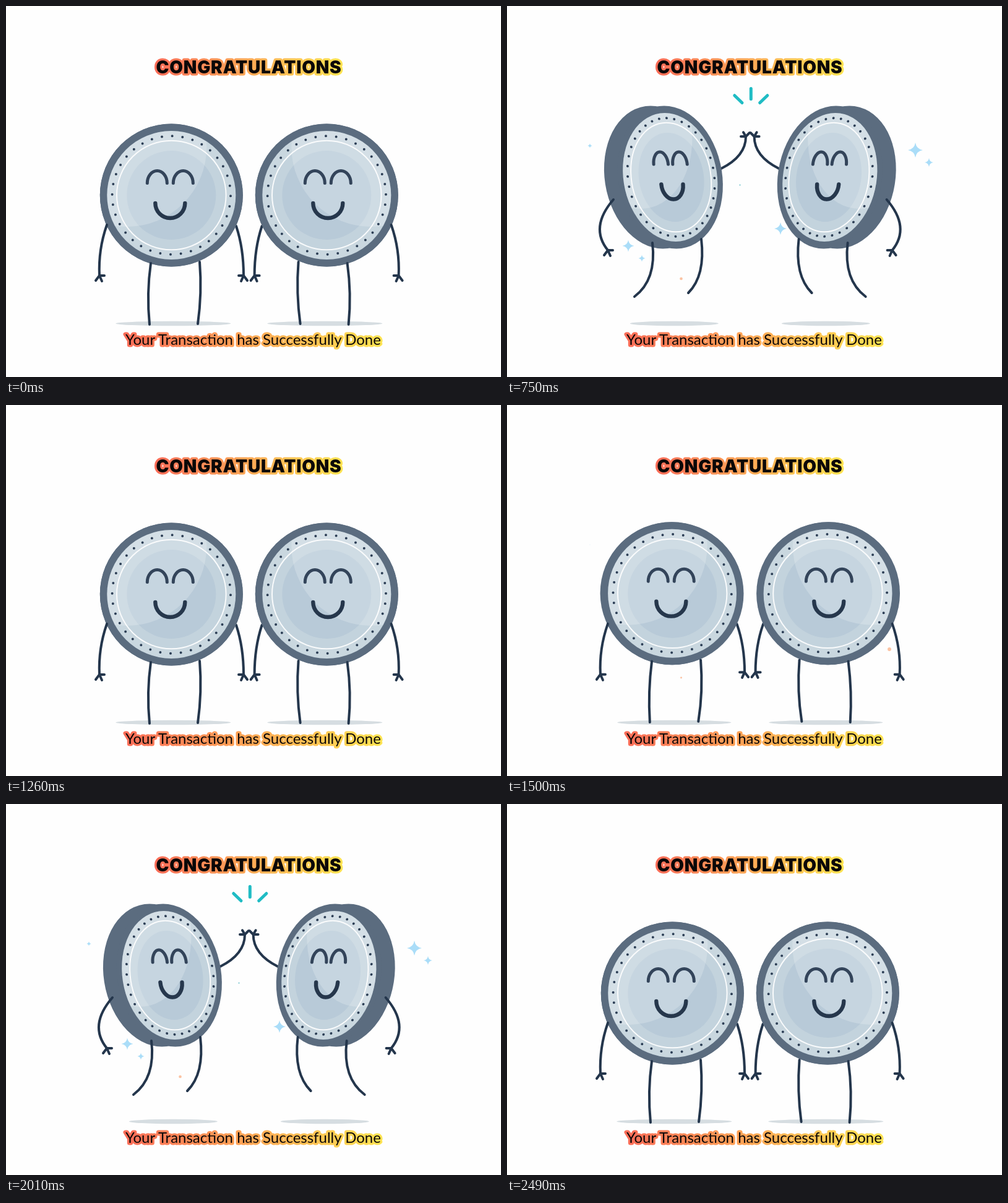
Animation, 800 px wide and 600 px high, one loop 2520 ms. Source, as an HTML page with a canvas:

```html
<!DOCTYPE html>
<html lang="en">
<head>
<meta charset="utf-8">
<title>Congratulations</title>
<style>
  html, body { margin: 0; width: 100%; height: 100%; overflow: hidden; background: #fefefe; }
  canvas, svg { position: absolute; left: 0; top: 0; width: 800px; height: 600px; }
  text { text-anchor: middle; fill: #0b0808; stroke: url(#warm); stroke-width: 7px; stroke-linejoin: round; paint-order: stroke; }
  .title { font: 900 28px Inter, sans-serif; letter-spacing: .8px; }
  .note { font: 400 24px Lato, sans-serif; }
</style>
</head>
<body>
<canvas id="stage" width="800" height="600"></canvas>
<svg viewBox="0 0 800 600">
  <defs>
    <linearGradient id="warm">
      <stop offset="0" stop-color="#fb6d58"/><stop offset=".5" stop-color="#ffa855"/><stop offset="1" stop-color="#ffe352"/>
    </linearGradient>
  </defs>
  <text class="title" x="392.5" y="109">CONGRATULATIONS</text>
  <text class="note" x="399.5" y="548">Your Transaction has Successfully Done</text>
</svg>
<script>
const ctx = document.getElementById('stage').getContext('2d');
const PERIOD = 1260, MIRROR = 785.6, TAU = Math.PI * 2;
const INK = '#24364c', RIM = '#5b6c7f';

// Start, control and end point on the ground and in the air.
const LEGS = [
  { down: [234, 416, 227, 465, 232, 515], up: [235, 383, 242, 443, 206, 470] },
  { down: [313, 414, 317, 464, 310, 514], up: [314, 377, 321, 436, 293, 464] }
];
// Arms trail the body by a power of its progress; bulge pushes them out half way.
const OUTER_ARM = { down: [163, 354, 149, 394, 151, 436], up: [172, 313, 133, 358, 163, 395], lag: 1.7, bulge: -6 };
const INNER_ARM = { down: [372, 356, 384, 392, 384, 436], up: [346, 263, 386, 243, 386, 211], lag: 1.3, bulge: 0 };
const FINGERS = [[6, 8], [-8, 0], [-4, 9]];

const clamp = v => Math.max(0, Math.min(1, v));
const ramp = (t, a, b) => clamp((t - a) / (b - a));
const ease = v => v * v * (3 - 2 * v);
const lerp = (a, b, v) => a + (b - a) * v;
const pulse = (t, a, b) => Math.sin(Math.PI * ramp(t, a, b));
const lift = t => ease(ramp(t, 190, 595)) * (1 - ease(ramp(t, 790, 1190)));

function fill(color) { ctx.fillStyle = color; ctx.fill(); }
function stroke(color, width) { ctx.strokeStyle = color; ctx.lineWidth = width; ctx.stroke(); }
function line(x1, y1, x2, y2) { ctx.moveTo(x1, y1); ctx.lineTo(x2, y2); }

function limb(p, { down, up, lag = 1, bulge = 0 }, side = 0, flip = 1) {
  const q = p ** lag, push = bulge * 4 * q * (1 - q);
  const [x, y, cx, cy, ex, ey] = down.map((v, i) => lerp(v, up[i], q) + (i % 2 ? 0 : push));
  ctx.beginPath();
  ctx.moveTo(x, y);
  ctx.quadraticCurveTo(cx, cy, ex, ey);
  if (side) {
    for (const [dx, dy] of FINGERS) line(ex, ey, ex + dx * side, ey + dy * lerp(1, flip, q));
  }
  stroke(INK, 4);
}

function coin(p) {
  const turn = .75 * p, swing = 3.5 * Math.sin(p * Math.PI / 2);
  const x = 267.3 - swing, y = 306 - 29 * p;

  // Turned discs narrow and lean; lines keep an even width.
  const shape = (build, dx = 0, dy = 0) => {
    ctx.save();
    ctx.transform(Math.cos(turn), 0, .086 * p, 1, x + dx, y + dy);
    ctx.beginPath();
    build();
    ctx.restore();
  };
  const disc = (r, color, dx) => {
    shape(() => ctx.arc(0, 0, r, 0, TAU), dx);
    fill(color);
  };

  disc(115.5, RIM, -32 * Math.sin(turn));
  disc(115.5, RIM);
  disc(104, '#c9d7df');
  disc(89, '#c3d3dd', swing * .4);
  disc(72, '#b8cad8', swing * .5);

  ctx.save();
  shape(() => ctx.arc(0, 0, 104, 0, TAU));
  ctx.clip();
  shape(() => ctx.arc(-72, -78, 129, 0, TAU));
  fill('rgba(255,255,255,.2)');
  ctx.restore();

  shape(() => ctx.arc(0, 0, 88.3, 0, TAU), swing * .4);
  stroke('rgba(255,255,255,.9)', 2);

  shape(() => {
    for (let i = 0; i < 36; i++) {
      const a = (i * 10 + .8) * Math.PI / 180;
      const dx = 95.7 * Math.cos(a), dy = 95.7 * Math.sin(a);
      ctx.moveTo(dx + 2, dy);
      ctx.ellipse(dx, dy, 2 / Math.cos(turn), 2, 0, 0, TAU);
    }
  }, swing * .4);
  fill('#2c3e55');

  for (const cx of [-23, 19]) {
    shape(() => ctx.ellipse(cx, -19.5, 16, 20, 0, Math.PI, TAU), swing, -1.5 * p);
    stroke('#33445a', 5);
  }
  shape(() => ctx.arc(-2, 13, 24, 0, Math.PI), swing, -1.5 * p);
  stroke('#26374c', 6.4);
}

function buddy(p) {
  ctx.beginPath();
  ctx.ellipse(270.3, 513.5, 93 - 21.5 * p, 3.7, 0, 0, TAU);
  fill('#d6dde1');
  limb(p, INNER_ARM, 1, -.75);
  coin(p);
  LEGS.forEach(leg => limb(p, leg));
  limb(p, OUTER_ARM, -1);
}

function star(x, y, r) {
  ctx.beginPath();
  for (let i = 0; i <= 4; i++) {
    const a = i * Math.PI / 2, b = a - Math.PI / 4;
    ctx.quadraticCurveTo(
      x + r * .2 * Math.cos(b), y + r * .2 * Math.sin(b),
      x + r * Math.cos(a), y + r * Math.sin(a));
  }
  fill('#aaddf8');
}

function starPair(x, y, r) {
  star(x, y, r);
  star(x + 22, y + 20, r * .58);
}

function dot(x, y, r, color) {
  ctx.beginPath();
  ctx.arc(x, y, r, 0, TAU);
  fill(color);
}

function sparkle(t) {
  const s = pulse(t, 530, 950);
  starPair(660, 233, 12 * s);
  starPair(196, 388, 9.5 * s);
  star(442, 360, 10 * s);
  ctx.globalAlpha = lerp(.5, 1, ramp(t, 400, 700));
  star(134, 226, 5 * pulse(t, 200, 960));
  ctx.globalAlpha = 1;
  dot(281.5, 441, 4 * pulse(t, 150, 900), '#fbc3a3');
  dot(618, 395, 3.3 * pulse(t, 0, 680), '#fbc3a3');
  dot(376.5, 289.5, 1.2 * pulse(t, 200, 980), '#5cb9c4');
}

function rays(t) {
  const tip = lerp(20, 37, ease(ramp(t, 600, 720)));
  const tail = lerp(20, 37, ease(ramp(t, 760, 890)));
  if (tip <= tail) return;
  ctx.beginPath();
  for (const a of [-.8, 0, .8]) {
    const dx = Math.sin(a), dy = -Math.cos(a);
    line(394.3 + dx * tail, 170.5 + dy * tail, 394.3 + dx * tip, 170.5 + dy * tip);
  }
  stroke('#20bcc4', 5);
}

function draw(t) {
  const p = lift(t);
  ctx.clearRect(0, 0, 800, 600);
  ctx.lineCap = ctx.lineJoin = 'round';
  sparkle(t);
  buddy(p);
  ctx.save();
  ctx.translate(MIRROR, 0);
  ctx.scale(-1, 1);
  buddy(p);
  ctx.restore();
  rays(t);
}

const start = performance.now();
function tick() {
  draw((performance.now() - start) % PERIOD);
  requestAnimationFrame(tick);
}
tick();
</script>
</body>
</html>
```
